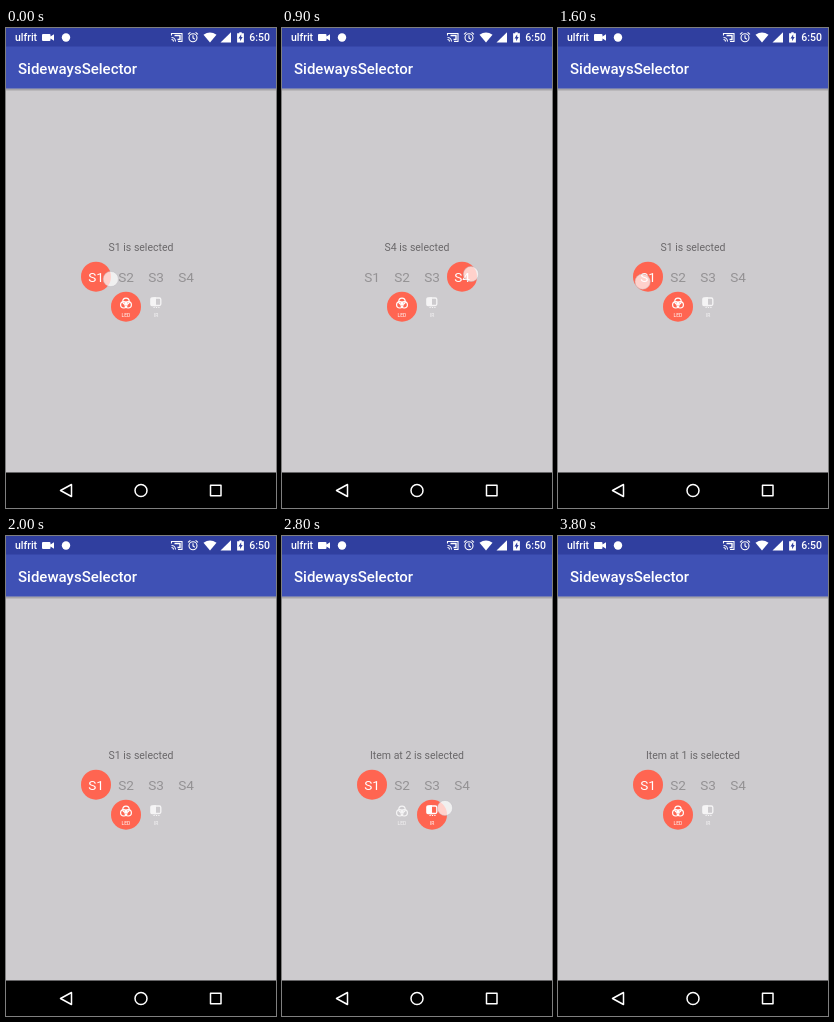
An HTML page that plays this animation: 270 by 480 pixels, repeating every 3900 ms.

```html
<!DOCTYPE html>
<html lang="en">
<head>
<meta charset="utf-8">
<title>Picker</title>
<style>
  html, body { margin: 0; width: 100%; height: 100%; overflow: hidden; background: #cdcbce; }
  svg { display: block; width: 270px; height: 480px; font-family: Roboto, sans-serif; }
  .mid { text-anchor: middle; }
  .line { fill: none; stroke: #fff; }
  .bold { font-weight: 500; fill: #fff; }
  .pick { font-size: 13.6px; fill: #949294; }
  .pick.on { fill: #fff; }
  .mode { opacity: .8; }
  .mode.on { opacity: 1; }
  .tag { font-size: 5px; fill: #fff; }
</style>
</head>
<body>
<svg viewBox="0 0 270 480">
  <defs>
    <linearGradient id="shade" x2="0" y2="1">
      <stop stop-color="#000" stop-opacity=".28"/>
      <stop offset="1" stop-color="#000" stop-opacity="0"/>
    </linearGradient>
  </defs>
  <rect width="270" height="480" fill="#cdcbce"/>
  <rect y="60.5" width="270" height="3" fill="url(#shade)"/>
  <rect width="270" height="60.5" fill="#3f51b5"/>
  <rect width="270" height="18.5" fill="#303f9f"/>
  <rect y="444.5" width="270" height="35.5"/>

  <!-- status bar -->
  <g fill="#fff">
    <text class="bold" x="9" y="13" font-size="10.5">ulfrit</text>
    <path d="M37 6h6.5q1 0 1 1v1.6l3.5-2.4v6.6l-3.500-2.4V12q0 1-1 1H37q-1 0-1-1V7q0-1 1-1z"/>
    <circle cx="60" cy="9.500" r="4.200"/>
    <g class="line" stroke-width="1.100">
      <path d="M165.500 7.500V5.500h10.500v8h-4M165.500 9.500a4 4 0 0 1 4 4M165.500 11.500a2 2 0 0 1 2 2"/>
      <path d="M168.500 7.500h5.500v4h-2.500" stroke-width="1.400"/>
      <circle cx="187" cy="9.800" r="4"/>
      <path d="M187 7.300v2.700l1.800 1.200M182 6.300l2.400-2M192 6.300l-2.400-2"/>
    </g>
    <path d="M197.500 6.800q6.500-4.600 13 0L204 14.500z"/>
    <path d="M225 4.200v10.300h-10.500z"/>
    <path d="M233.300 4.200h2.400v1h2.200v9.300h-6.800V5.200h2.200z"/>
    <path d="M235.200 6.300l-2.700 4.200h1.600v2.800l2.600-4.200h-1.500z" fill="#303f9f"/>
    <text class="bold" x="264" y="13" font-size="10.500" text-anchor="end">6:50</text>
  </g>
  <text class="bold" x="12" y="46" font-size="15">SidewaysSelector</text>

  <!-- navigation bar -->
  <g class="line" stroke-width="1.500" stroke-linejoin="round">
    <path d="M54.500 462.500l11-6v12z"/>
    <circle cx="135" cy="462.500" r="6"/>
    <rect x="204.500" y="457.200" width="10.500" height="10.500"/>
  </g>

  <text id="label" class="mid" x="135" y="223" font-size="10.500" fill="#6a686a"></text>
  <g fill="#ff6551">
    <circle id="topDot" cx="90" cy="248.700" r="15"/>
    <circle id="modeDot" cx="120" cy="278.700" r="15"/>
  </g>
  <g class="mid">
    <text class="pick" x="90" y="253.700">S1</text>
    <text class="pick" x="120" y="253.700">S2</text>
    <text class="pick" x="150" y="253.700">S3</text>
    <text class="pick" x="180" y="253.700">S4</text>
  </g>
  <g class="mode mid">
    <g class="line" stroke-width="1.200">
      <circle cx="120" cy="273.300" r="3.200"/>
      <circle cx="117.800" cy="276.800" r="3.200"/>
      <circle cx="122.200" cy="276.800" r="3.200"/>
    </g>
    <path d="M118 274.600h4l-2 3.200z" fill="#fff"/>
    <text class="tag" x="120" y="289.300">LED</text>
  </g>
  <g class="mode mid">
    <rect class="line" x="146.800" y="270" width="8" height="7.500" rx="1.500" stroke-width="1.300"/>
    <path d="M146 269.300h4v8.900h-4q-1.800 0-1.800-1.800v-5.300q0-1.800 1.800-1.800z" fill="#fff"/>
    <path class="line" d="M147.500 279.500h6" stroke-width="1.200" stroke-dasharray="1.200 1.200"/>
    <text class="tag" x="150" y="289.300">IR</text>
  </g>
  <circle id="touch" r="7.600" fill="#fff" fill-opacity=".7" stroke="#bdbbc2" stroke-opacity=".6" stroke-width=".8"/>
</svg>
<script>
  const LOOP = 3900, STEP = 100;
  // Each drag is a list of [time, x, y]; the finger lifts after the last point.
  const topDrag = [[0, 104.8, 251], [300, 150, 248], [600, 174, 247], [900, 189, 246],
                   [1100, 154, 250], [1300, 107, 255], [1500, 86, 254], [1800, 82, 253]];
  const modeDrag = [[2400, 119, 276], [2600, 142, 274], [2800, 163, 272],
                    [3000, 158, 273], [3300, 121, 277], [3500, 117, 278]];
  const $ = id => document.getElementById(id);
  const picks = document.querySelectorAll('.pick');
  const modes = document.querySelectorAll('.mode');

  function follow(path, t) {
    const last = path.length - 1;
    if (t <= path[0][0]) return path[0].slice(1);
    if (t >= path[last][0]) return path[last].slice(1);
    const i = path.findIndex(p => p[0] > t);
    const [a, b] = [path[i - 1], path[i]];
    const k = (t - a[0]) / (b[0] - a[0]);
    return [1, 2].map(n => a[n] + (b[n] - a[n]) * k);
  }

  const held = (path, t) => t >= path[0][0] && t <= path[path.length - 1][0];
  const cell = (x, left, count) => Math.max(0, Math.min(count - 1, Math.floor((x - left) / 30)));
  const mark = (items, index) => items.forEach((el, i) => el.classList.toggle('on', i === index));

  function draw(t) {
    const top = follow(topDrag, t), low = follow(modeDrag, t);
    const pick = cell(top[0], 75, 4), mode = cell(low[0], 105, 2);
    const modeChanged = mode === 1 || t > 2800;
    $('label').textContent = (modeChanged ? `Item at ${mode + 1}` : `S${pick + 1}`) + ' is selected';
    $('topDot').setAttribute('cx', 90 + 30 * pick);
    $('modeDot').setAttribute('cx', 120 + 30 * mode);
    mark(picks, pick);
    mark(modes, mode);

    const onTop = held(topDrag, t);
    const [x, y] = onTop ? top : low;
    $('touch').setAttribute('cx', x);
    $('touch').setAttribute('cy', y);
    $('touch').style.display = onTop || held(modeDrag, t) ? '' : 'none';
  }

  const start = performance.now();
  function tick() {
    const t = (performance.now() - start) % LOOP;
    draw(Math.floor(t / STEP) * STEP);
    requestAnimationFrame(tick);
  }
  tick();
</script>
</body>
</html>
```
